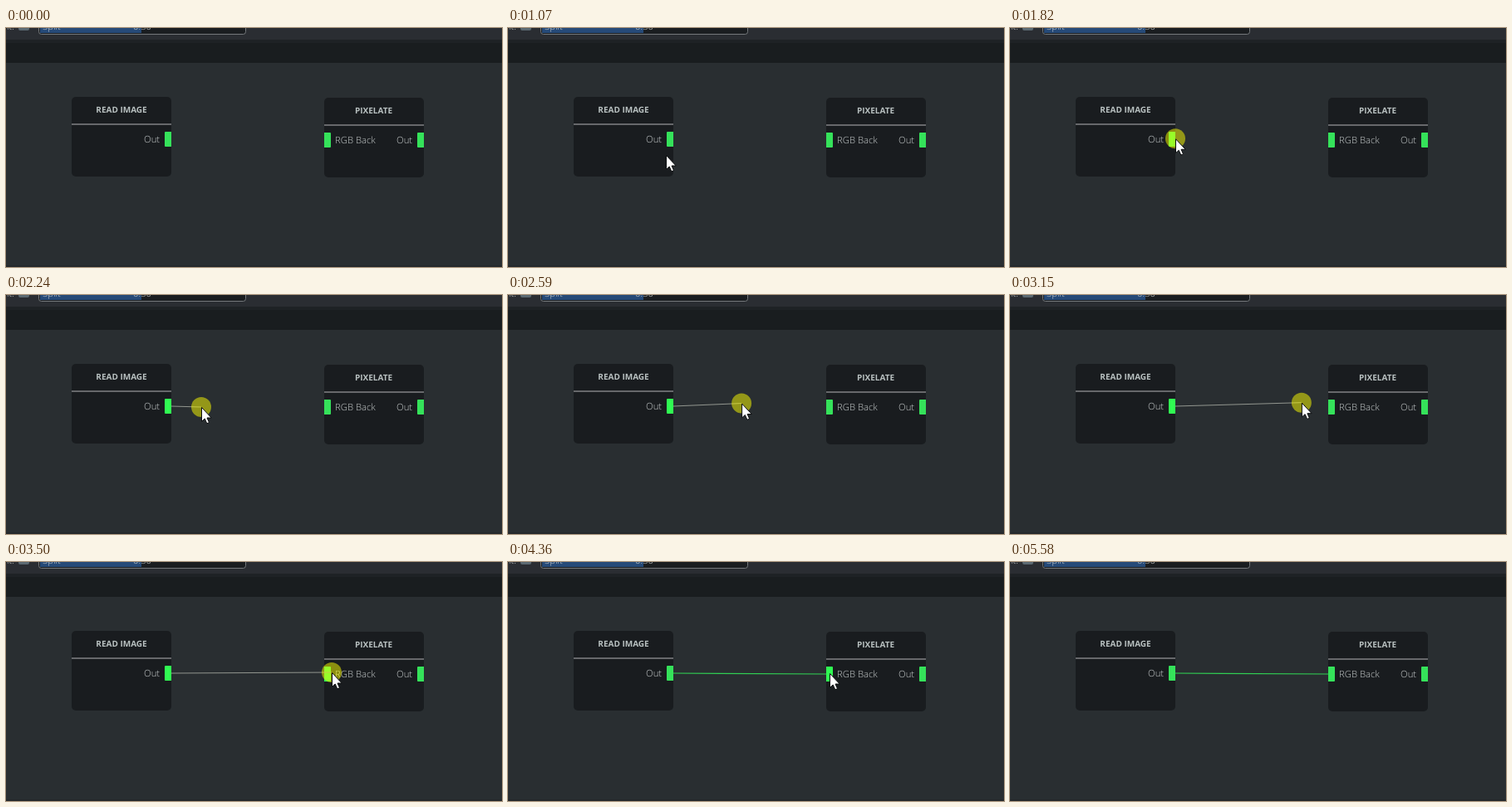
These frames come from a looping animation (597 by 288 pixels, 6.44 s). An HTML page:

```html
<!DOCTYPE html>
<html lang="en">
<head>
<meta charset="utf-8">
<title>Connecting two nodes</title>
<style>
  html, body { margin: 0; width: 100%; height: 100%; overflow: hidden; background: #292e31; }
  svg { display: block; }
  text { font: 300 11.3px "Open Sans", sans-serif; fill: #c8cdcd; text-rendering: geometricPrecision; }
  .title { font-size: 10px; font-weight: 700; text-anchor: middle; fill: #b9c1c1; }
  .port { fill: #35e25a; }
  .port.hot { fill: #30fa52; }
</style>
</head>
<body>
<svg width="597" height="288" viewBox="0 0 597 288">
  <defs>
    <g id="box">
      <rect width="120" height="96" rx="5" fill="#191c1f"/>
      <rect y="32" width="120" height="2" fill="#67686b"/>
      <text x="87" y="55">Out</text>
    </g>
    <path id="plug" d="M0 0h7q1 0 1 1v16q0 1-1 1h-7z"/>
  </defs>

  <!-- toolbar -->
  <rect width="597" height="14" fill="#2a2d32"/>
  <rect y="14" width="597" height="4" fill="#1e2225"/>
  <rect y="18" width="597" height="24" fill="#191d1f"/>
  <rect y="286" width="597" height="2" fill="#24282b"/>
  <text x="10" y="2" text-anchor="end">int:</text>
  <rect x="15" y="-9" width="13" height="12" rx="2" fill="#5b6972"/>
  <rect x="39.5" y="-12.5" width="249" height="20" rx="3" fill="#1a1d20" stroke="#74787b"/>
  <rect x="41" y="-11" width="122" height="17" fill="#264a78"/>
  <text x="44" y="2">Split</text>
  <text x="153" y="2">0.50</text>

  <!-- nodes -->
  <g transform="translate(79 83)">
    <use href="#box"/>
    <text class="title" x="60" y="19">READ IMAGE</text>
    <use id="out" class="port" href="#plug" transform="translate(120 42) scale(-1 1)"/>
  </g>
  <g transform="translate(383 84)">
    <use href="#box"/>
    <text class="title" x="59.5" y="19">PIXELATE</text>
    <text x="13" y="55">RGB Back</text>
    <use id="in" class="port" href="#plug" y="42"/>
    <use class="port" href="#plug" transform="translate(120 42) scale(-1 1)"/>
  </g>

  <line id="wire" x1="199" y1="134"/>
  <g id="cursor">
    <circle id="press" r="12" fill="#ff0" fill-opacity=".5"/>
    <path d="M.5.5V17.4L4.2 14 6.8 19.8 9.5 18.6 7 13H12.2Z" fill="#fff" stroke="#0c0e10"/>
  </g>
</svg>
<script>
const LOOP = 6440, STEP = 70;
const SHOW = 720, REACH = 1350, PRESS = 1750, ENTER = 3430, RELEASE = 4360, LEAVE = 4890, HIDE = 5580;

// Pointer moves: start, end, x, y reached; it rests between moves.
const entry = [207, 270];
const moves = [
  [SHOW, 1070, 190, 153],
  [1070, 1210, 183, 140],
  [1210, REACH, 193, 133],
  [PRESS, 2240, 235, 135],
  [2240, 2870, 318, 127],
  [2870, 3500, 392, 133],
  [3560, 3900, 387, 134],
  [LEAVE - STEP, 5030, 399, 139],
  [5160, HIDE - STEP, 538, 266]
];

const $ = id => document.getElementById(id);
const wire = $("wire"), cursor = $("cursor"), press = $("press");
const show = (el, on) => el.setAttribute("visibility", on ? "visible" : "hidden");
const set = (el, attrs) => {
  for (const name in attrs) el.setAttribute(name, attrs[name]);
};

function pointer(t) {
  let [x, y] = entry;
  for (const [from, to, toX, toY] of moves) {
    if (t < from) break;
    const k = Math.min(1, Math.floor((t - from) / STEP) * STEP / (to - from));
    x += (toX - x) * k;
    y += (toY - y) * k;
  }
  return [x, y];
}

function draw(t) {
  const [x, y] = pointer(t);
  const dragging = t >= PRESS && t < RELEASE;
  const linked = t >= RELEASE;

  set(cursor, { transform: `translate(${x} ${y})` });
  show(cursor, t >= SHOW && t < HIDE);
  show(press, dragging);
  show(wire, linked || dragging && x > 199);
  set(wire, linked
    ? { x2: 383, y2: 135, stroke: "#30d053", "stroke-width": 1.2 }
    : { x2: x, y2: y, stroke: "#92968f", "stroke-width": 1 });
  $("out").classList.toggle("hot", t >= REACH && t < RELEASE);
  $("in").classList.toggle("hot", t >= ENTER && t < LEAVE);
}

const start = performance.now();
function tick() {
  draw((performance.now() - start) % LOOP);
  requestAnimationFrame(tick);
}
tick();
</script>
</body>
</html>
```
